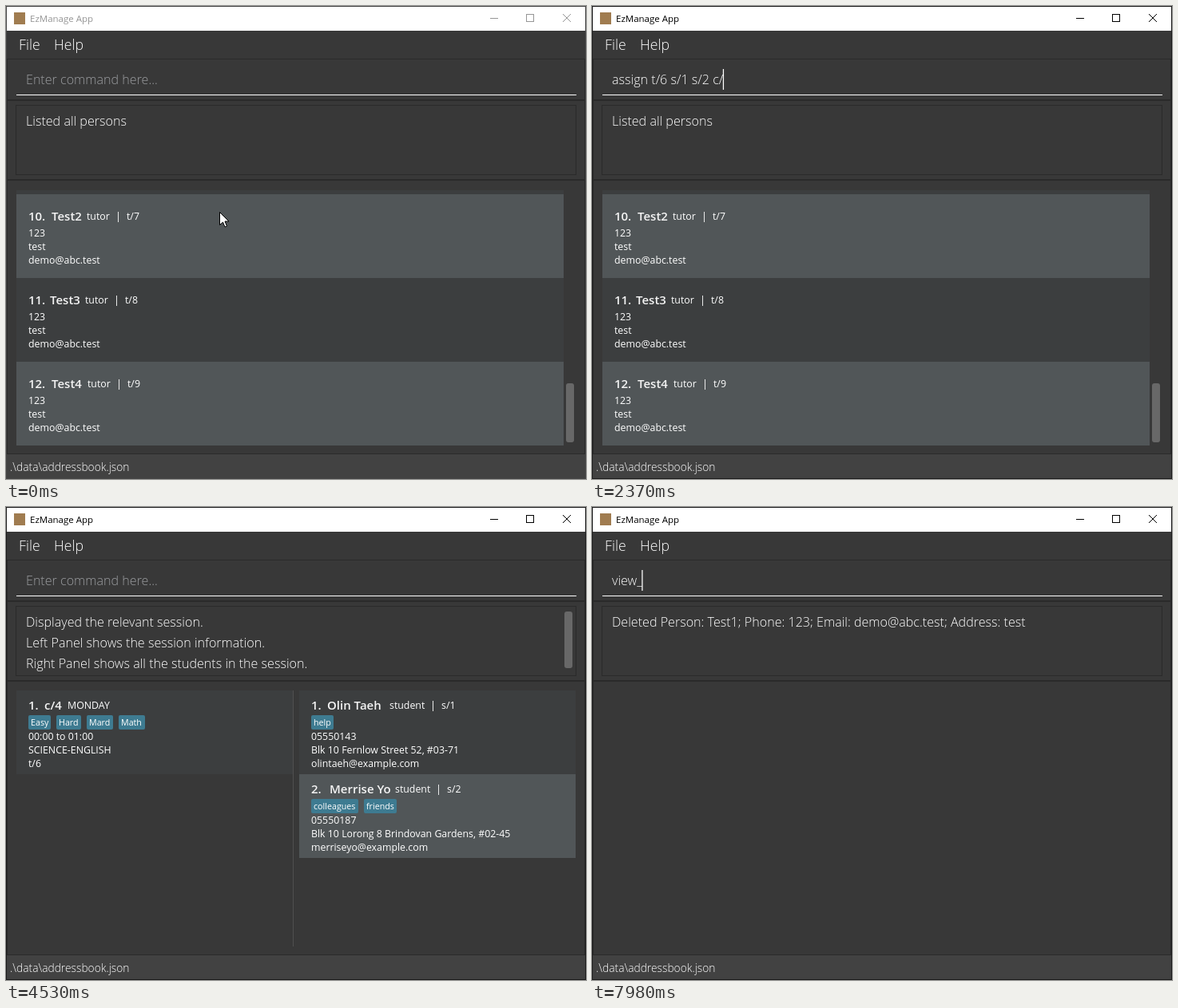
Recreate the animation shown at these times as an HTML page with a canvas. Size 726 by 593 pixels, loop 8 s.

```html
<!DOCTYPE html>
<html lang="en">
<head>
<meta charset="utf-8">
<title>EzManage App</title>
<style>
  html, body { margin: 0; width: 726px; height: 593px; overflow: hidden; background: #383838; }
  canvas { display: block; }
</style>
</head>
<body>
<canvas id="stage" width="726" height="593"></canvas>
<script>
const ctx = document.getElementById('stage').getContext('2d', { alpha: false });
const LOOP = 8000, TICK = 30, ACTIVATE = 450;
const FAMILY = '"Open Sans", "Noto Sans", sans-serif';
const FONT = {
  title: `400 11.5px ${FAMILY}`,
  menu: `300 17.7px ${FAMILY}`,
  field: `300 16.1px ${FAMILY}`,
  status: `300 13.8px ${FAMILY}`,
  name: `600 15px ${FAMILY}`,
  small: `400 12.35px ${FAMILY}`,
  tag: `400 10.7px ${FAMILY}`
};
const COLOR = {
  back: '#383838', line: '#2a2a2a', even: '#3c3e3f', odd: '#515658',
  status: '#424242', thumb: '#686868', tag: '#3e7b91', prompt: '#9b9da0'
};
const MAIL = 'demo@abc.test';

// Command field: text null means the prompt is showing.
const fieldSteps = [];
const setField = (time, text, caret = true) =>
  fieldSteps.push({ time: Math.round(time / TICK) * TICK, text, caret });
const type = (from, to, base, added) => {
  for (let i = 1; i <= added.length; i++) {
    setField(from + (to - from) * (i - 1) / (added.length - 1), base + added.slice(0, i));
  }
};

setField(0, null, false);
setField(ACTIVATE, '');
setField(690, '', false);
type(750, 1200, '', 'assign t/');
setField(1410, 'assign t/6');
setField(1500, 'assign t/6 ');
setField(1620, 'assign t/6 s');
setField(1680, 'assign t/6 s/');
type(1890, 2430, 'assign t/6 s/', '1 s/2 c/4');
setField(2490, '');
setField(2670, '', false);
setField(2880, '');
setField(3060, 'v');
setField(3120, 'vi');
setField(3180, '');
type(3360, 3630, '', 'view_st');
['view_stu', 'view_st', 'view_s', 'view_', 'view_s', 'view_se']
  .forEach((text, i) => setField(3780 + i * 54, text));
type(4110, 4470, 'view_se', 'ssion c/4');
setField(4530, null, false);
setField(5640, '');
type(5700, 6000, '', 'delete');
setField(6210, 'delete', false);
type(6390, 6930, 'delete', '_person t/');
setField(7110, 'delete_person t/', false);
setField(7200, 'delete_person t/6');
setField(7350, '');
setField(7530, '', false);
type(7710, 7980, '', 'view_');

const scenes = [
  { time: 0, result: ['Listed all persons'], list: drawPersons },
  { time: 2490, result: ['New assignment added: StudentId: [s/1, s/2]; TutorId: t/6; SessionId: c/4;'] },
  {
    time: 4530,
    result: [
      'Displayed the relevant session.',
      'Left Panel shows the session information.',
      'Right Panel shows all the students in the session.'
    ],
    list: drawSession
  },
  { time: 7350, result: [`Deleted Person: Test1; Phone: 123; Email: ${MAIL}; Address: test`] }
];

// Pointer trips: quadratic curves that end in the command field.
const trips = [
  { from: 0, start: 30, end: 420, hide: 690, path: [[267, 258], [190, 150], [80, 92]] },
  { from: 5340, start: 5340, end: 5610, hide: 5700, path: [[190, -10], [190, 190], [102, 92]] }
];

const latest = (steps, t) => steps.filter(step => step.time <= t).pop();

function rect(x, y, w, h, color) {
  ctx.fillStyle = color;
  ctx.fillRect(x, y, w, h);
}

function frame(x, y, w, h, color = COLOR.line) {
  ctx.strokeStyle = color;
  ctx.lineWidth = 1;
  ctx.strokeRect(x + 0.5, y + 0.5, w - 1, h - 1);
}

function rounded(x, y, w, h, r, color) {
  ctx.fillStyle = color;
  ctx.beginPath();
  ctx.roundRect(x, y, w, h, r);
  ctx.fill();
}

function text(value, x, y, font, color = '#fff') {
  ctx.font = font;
  ctx.fillStyle = color;
  ctx.fillText(value, x, y);
}

function heading(x, y, number, name, nameX) {
  text(number, x, y, FONT.name, '#f4f4f4');
  text(name, nameX, y, FONT.name, '#f4f4f4');
}

function role(label, id, x, y, barGap) {
  text(label, x, y, FONT.small);
  rect(x + barGap, y - 10, 1, 13, '#e8e8e8');
  text(id, x + barGap + 11, y, FONT.small);
}

function details(lines, x, y) {
  lines.forEach((line, i) => text(line, x, y + i * 17, FONT.small));
}

function tag(label, x, y, w) {
  rounded(x, y, w, 18, 2, COLOR.tag);
  text(label, x + 3, y + 13, FONT.tag);
}

function drawPersons() {
  rect(13, 231, 685, 5, COLOR.even);
  [[57, 101], [55, 99], [57, 102]].forEach(([nameX, roleX], i) => {
    const top = 236 + i * 105;
    rect(13, top, 685, 105, i % 2 ? COLOR.even : COLOR.odd);
    heading(28, top + 33, `${10 + i}.`, `Test${2 + i}`, nameX);
    role('tutor', `t/${7 + i}`, roleX, top + 32, 39);
    details(['123', 'test', MAIL], 28, top + 53);
  });
  rounded(701, 473, 10, 74, 3, COLOR.thumb);
}

function drawSession() {
  rounded(699, 131, 10, 71, 3, COLOR.thumb);

  rect(13, 230, 347, 105, COLOR.even);
  rect(359, 230, 1, 321, '#505050');
  heading(28, 254, '1.', 'c/4', 48);
  text('MONDAY', 77, 253, FONT.small);
  tag('Easy', 28, 261, 28);
  tag('Hard', 63, 261, 31);
  tag('Mard', 101, 261, 33);
  tag('Math', 141, 261, 33);
  details(['00:00 to 01:00', 'SCIENCE-ENGLISH', 't/6'], 28, 292);

  rect(367, 230, 346, 105, COLOR.even);
  heading(382, 254, '1.', 'Olin Taeh', 402);
  role('student', 's/1', 480, 253, 54);
  tag('help', 382, 261, 28);
  details(['05550143', 'Blk 10 Fernlow Street 52, #03-71', 'olintaeh@example.com'], 382, 292);

  rect(367, 335, 346, 105, COLOR.odd);
  heading(382, 359, '2.', 'Merrise Yo', 405);
  role('student', 's/2', 487, 358, 54);
  tag('colleagues', 382, 366, 59);
  tag('friends', 448, 366, 41);
  details(['05550187', 'Blk 10 Lorong 8 Brindovan Gardens, #02-45', 'merriseyo@example.com'], 382, 397);
}

function drawTitleBar(active) {
  const ink = active ? '#000' : '#969696';
  rect(1, 1, 724, 30, '#fff');
  rect(10, 8, 14, 15, '#a07c50');
  text('EzManage App', 30, 20, FONT.title, ink);
  rect(606, 15, 10, 1, ink);
  frame(651, 10, 10, 10, ink);
  ctx.beginPath();
  ctx.moveTo(697, 10);
  ctx.lineTo(707, 20);
  ctx.moveTo(707, 10);
  ctx.lineTo(697, 20);
  ctx.stroke();
}

function drawWindow(active) {
  rect(0, 0, 726, 593, COLOR.back);
  drawTitleBar(active);
  text('File', 16, 55, FONT.menu);
  text('Help', 60, 55, FONT.menu);
  frame(1, 66, 724, 52);
  frame(1, 118, 724, 100);
  frame(1, 218, 724, 344);
  rect(13, 111, 701, 1, '#fff');
  frame(12, 124, 702, 88);
  rect(1, 562, 724, 30, COLOR.status);
  text('.\\data\\addressbook.json', 5, 583, FONT.status);
  frame(0, 0, 726, 593, active ? '#1a1a1a' : '#444');
}

function drawField({ text: value, caret }) {
  text(value ?? 'Enter command here...', 25, 98, FONT.field, value === null ? COLOR.prompt : '#fff');
  if (caret) rect(24.5 + ctx.measureText(value).width, 79, 1.25, 26, '#fff');
}

function drawPointer(t) {
  const trip = trips.find(({ from, hide }) => t >= from && t < hide);
  if (!trip) return;
  const u = Math.min(1, Math.max(0, (t - trip.start) / (trip.end - trip.start)));
  const s = u * u * (3 - 2 * u);
  const [a, b, c] = trip.path;
  const [x, y] = [0, 1].map(k =>
    Math.round(a[k] * (1 - s) ** 2 + 2 * b[k] * s * (1 - s) + c[k] * s * s));

  if (y > 70 && y < 112) {
    rect(x, y - 8, 1, 17, '#c7c7c7');
    rect(x - 3, y - 9, 7, 1, '#c7c7c7');
    rect(x - 3, y + 9, 7, 1, '#c7c7c7');
    return;
  }
  ctx.beginPath();
  [[0, 0], [0, 16], [4, 12.5], [6.5, 18.5], [9, 17.5], [6.5, 11.5], [11.5, 11.5]]
    .forEach(([dx, dy]) => ctx.lineTo(x + dx + 0.5, y + dy + 0.5));
  ctx.closePath();
  ctx.fillStyle = '#fff';
  ctx.fill();
  ctx.strokeStyle = '#000';
  ctx.stroke();
}

function draw(t) {
  const scene = latest(scenes, t);
  drawWindow(t >= ACTIVATE);
  drawField(latest(fieldSteps, t));
  scene.result.forEach((line, i) => text(line, 25, 150 + i * 26, FONT.field));
  scene.list?.();
  drawPointer(t);
}

const startTime = performance.now();
function tick() {
  const t = (performance.now() - startTime) % LOOP;
  draw(Math.floor(t / TICK) * TICK);
  requestAnimationFrame(tick);
}
tick();
</script>
</body>
</html>
```
